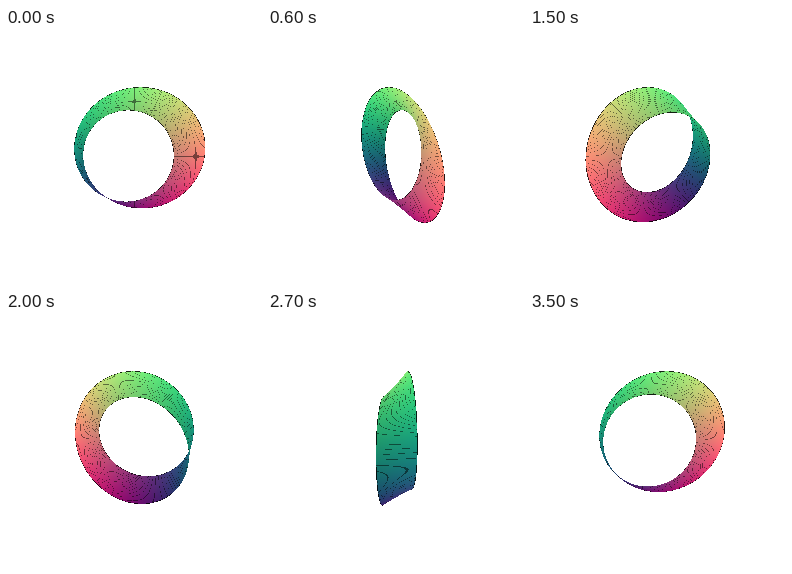
An HTML page with a canvas for the animation above (3.6 s loop, 256 by 256 pixels).

```html
<!DOCTYPE html>
<html lang="en">
<head>
<meta charset="utf-8">
<title>Turning Möbius strip</title>
<style>
html, body { margin: 0; width: 100%; height: 100%; overflow: hidden; background: #fff; }
canvas { display: block; width: 256px; height: 256px; image-rendering: pixelated; }
</style>
</head>
<body>
<canvas id="stage" width="256" height="256"></canvas>
<script>
const SIZE = 256, MID = 128;
const STEPS = 36, STEP_MS = 100;
const COLS = 360, ROWS = 6;
const HALF_WIDTH = 0.285;
const DIST = 3.85, FOCAL = 54.7 * DIST;
const SIN_TILT = 0.311, COS_TILT = Math.sqrt(1 - SIN_TILT * SIN_TILT);
const LINE = 0.045, LINE_SHADE = 0.5;
const RIM = 0.97, RIM_SHADE = 0.15;

const ctx = document.getElementById('stage').getContext('2d');
const image = ctx.createImageData(SIZE, SIZE);
const pixels = new Uint32Array(image.data.buffer);
const depths = new Float32Array(SIZE * SIZE);

// Point on the strip: col runs along it in degrees, v across it from -1 to 1
function surface(col, v) {
  const t = col * 2 * Math.PI / COLS;
  const s = v * HALF_WIDTH;
  const r = 1 + s * Math.cos(t / 2);
  return { x: r * Math.cos(t), y: r * Math.sin(t), z: s * Math.sin(t / 2), v };
}

const mesh = [];
for (let i = 0; i <= COLS; i++) {
  const row = [];
  for (let j = 0; j <= ROWS; j++) row.push(surface(i, 2 * j / ROWS - 1));
  mesh.push(row);
}

function project(p, sin, cos) {
  const x = p.x * cos - p.z * sin;
  const z = p.x * sin + p.z * cos;
  p.depth = DIST - p.y * SIN_TILT - z * COS_TILT;
  const k = FOCAL / p.depth;
  p.sx = MID + x * k;
  p.sy = MID - (p.y * COS_TILT - z * SIN_TILT) * k;
}

const channel = c => Math.max(0, Math.min(255, Math.round(c)));

function colour(x, y, z, shade) {
  const r = channel(shade * (125 + 102 * x));
  const g = channel(shade * (125 + 96 * y));
  const b = channel(shade * (116 + 30 * z));
  return (255 << 24 | b << 16 | g << 8 | r) >>> 0;
}

// u: place between two neighbouring mesh lines, v: place across the strip
function shadeAt(u, v) {
  if (Math.abs(v) > RIM) return RIM_SHADE;
  return u < LINE || u > 1 - LINE ? LINE_SHADE : 1;
}

function triangle(a, b, c, ua, ub, uc) {
  const area = (b.sx - a.sx) * (c.sy - a.sy) - (b.sy - a.sy) * (c.sx - a.sx);
  if (Math.abs(area) < 1e-9) return;
  const x0 = Math.ceil(Math.min(a.sx, b.sx, c.sx));
  const x1 = Math.floor(Math.max(a.sx, b.sx, c.sx));
  const y0 = Math.ceil(Math.min(a.sy, b.sy, c.sy));
  const y1 = Math.floor(Math.max(a.sy, b.sy, c.sy));
  for (let y = y0; y <= y1; y++) {
    for (let x = x0; x <= x1; x++) {
      const wb = ((x - a.sx) * (c.sy - a.sy) - (y - a.sy) * (c.sx - a.sx)) / area;
      const wc = ((b.sx - a.sx) * (y - a.sy) - (b.sy - a.sy) * (x - a.sx)) / area;
      const wa = 1 - wb - wc;
      if (wa < -1e-6 || wb < -1e-6 || wc < -1e-6) continue;
      const mix = (p, q, r) => wa * p + wb * q + wc * r;
      const depth = mix(a.depth, b.depth, c.depth);
      const at = y * SIZE + x;
      if (depth >= depths[at]) continue;
      depths[at] = depth;
      const shade = shadeAt(mix(ua, ub, uc), mix(a.v, b.v, c.v));
      pixels[at] = colour(mix(a.x, b.x, c.x), mix(a.y, b.y, c.y), mix(a.z, b.z, c.z), shade);
    }
  }
}

function draw(step) {
  const angle = step * 2 * Math.PI / STEPS;
  const sin = Math.sin(angle), cos = Math.cos(angle);
  pixels.fill(0xffffffff);
  depths.fill(Infinity);
  for (const row of mesh) for (const p of row) project(p, sin, cos);
  for (let i = 0; i < COLS; i++) {
    const m = mesh[i], n = mesh[i + 1];
    for (let j = 0; j < ROWS; j++) {
      triangle(m[j], n[j], n[j + 1], 0, 1, 1);
      triangle(m[j], n[j + 1], m[j + 1], 0, 1, 0);
    }
  }
  ctx.putImageData(image, 0, 0);
}

let shown = -1;
const start = performance.now();
function tick() {
  const step = Math.floor((performance.now() - start) / STEP_MS) % STEPS;
  if (step !== shown) draw(shown = step);
  requestAnimationFrame(tick);
}
tick();
</script>
</body>
</html>
```
